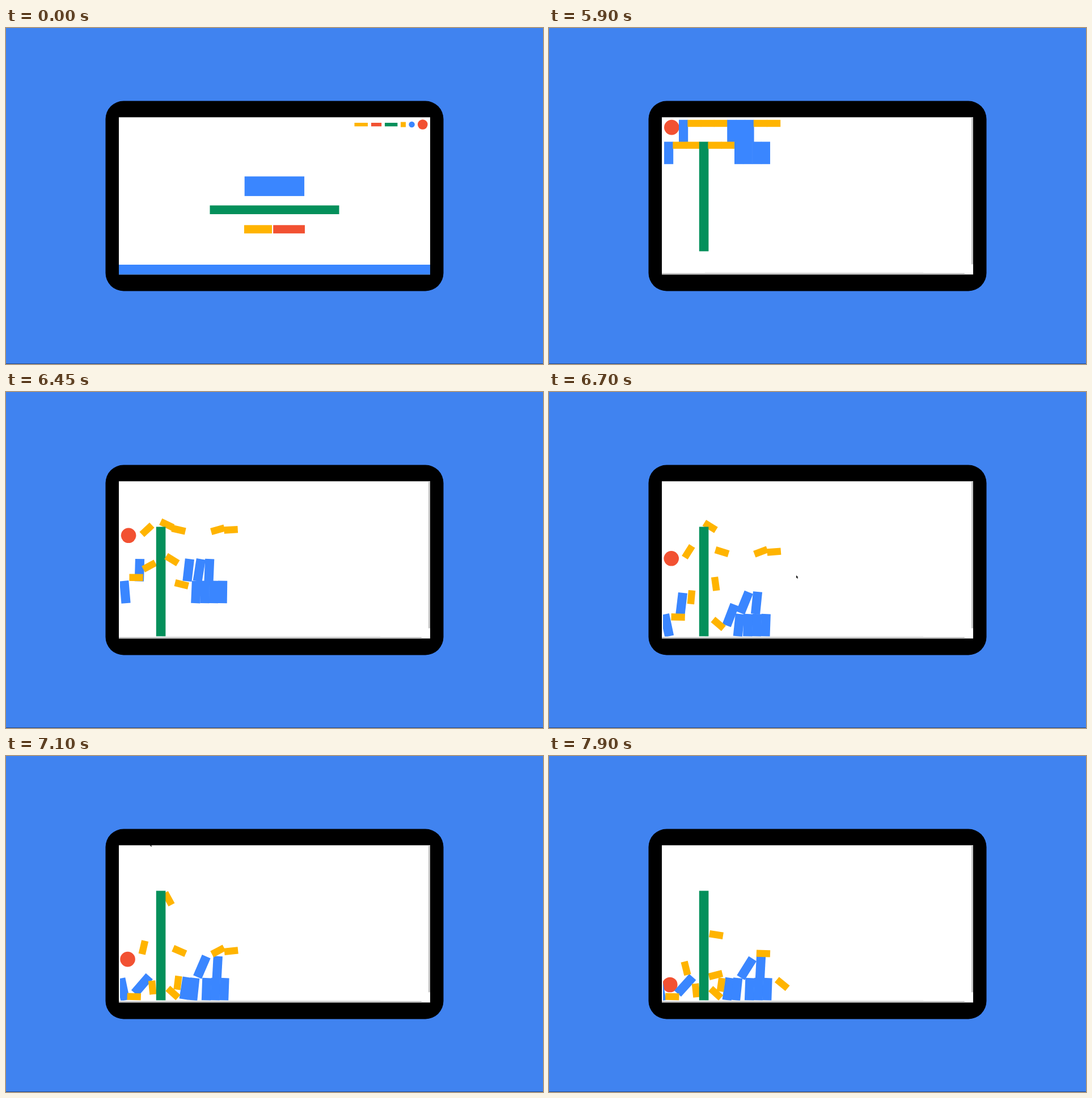
These frames come from a looping animation (947x592 px, 7.95 s). An HTML page:

```html
<!DOCTYPE html>
<html lang="en">
<head>
<meta charset="utf-8">
<title>Falling page blocks</title>
<style>
  html, body { margin: 0; width: 100%; height: 100%; overflow: hidden; background: #4083f0; }
  svg { display: block; width: 100vw; height: 100vh; }
  .blue { fill: #3a86ff; }
  .green { fill: #04905b; }
  .yellow { fill: #ffb400; }
  .red { fill: #f25132; }
</style>
</head>
<body>
<svg viewBox="0 0 947 592">
  <defs>
    <clipPath id="screen"><rect x="199" y="157.3" width="549" height="277"/></clipPath>
    <clipPath id="world"><rect x="201" y="157.3" width="544" height="273.5"/></clipPath>
  </defs>
  <rect width="947" height="592" fill="#4083f0"/>
  <rect y="591" width="947" height="1" fill="#254b8a"/>
  <rect x="175.5" y="128.5" width="596" height="335" rx="32"/>
  <rect x="199" y="157.3" width="549" height="277" fill="#fff"/>
  <g id="page">
    <rect class="yellow" x="614.5" y="167" width="23.5" height="6.3"/>
    <rect class="red" x="644" y="167" width="18.2" height="6.3"/>
    <rect class="green" x="668" y="167" width="22.4" height="6.3"/>
    <rect class="yellow" x="696" y="165.6" width="9" height="9"/>
    <circle class="blue" cx="715.6" cy="170" r="5.2"/>
    <circle class="red" cx="734.8" cy="170" r="8.8"/>
    <rect class="blue" x="420.7" y="261.5" width="105.4" height="34.6"/>
    <rect class="green" x="359.5" y="312.6" width="228" height="15.4"/>
    <rect class="yellow" x="420" y="347.3" width="49" height="14.6"/>
    <rect class="red" x="471.2" y="347.3" width="55.8" height="14.6"/>
    <rect class="blue" x="199" y="417" width="549" height="17.3"/>
  </g>
  <g id="fall">
    <g fill="#c6c6c6">
      <rect x="744.8" y="157.3" width="3.2" height="259"/>
      <rect x="199" y="431.8" width="534" height="2.5"/>
    </g>
    <rect x="275" y="430.2" width="385" height="1.2" fill="#ececec"/>
    <g id="blocks" clip-path="url(#world)"></g>
    <g clip-path="url(#screen)">
      <path id="cursor" d="M0 0V5L1.2 4L2 6L3 5.5L2.2 3.6H3.6Z" fill="#111"/>
    </g>
  </g>
</svg>
<script>
const LOOP = 7950, STEP = 50, SWITCH = 5800, RELEASE = 5900;
const GRAVITY = 0.0023, FLOOR = 430.5;
const $ = id => document.getElementById(id);

// advance = layout width, w/h = drawn size, speed = terminal speed in px/ms
const KINDS = {
  ball: { color: 'red', advance: 26, w: 26.6, h: 26.6, speed: 0.162 },
  post: { color: 'green', advance: 15.6, w: 16.6, h: 193, speed: 0.32 },
  brick: { color: 'blue', advance: 15.6, w: 16.2, h: 39.4, speed: 0.32 },
  chip: { color: 'yellow', advance: 23.2, w: 24.2, h: 12.4, speed: 0.155 }
};

// Bodies fall with drag to a contact height, then settle quickly or topple slowly.
class Body {
  constructor(kind, speed) {
    Object.assign(this, KINDS[kind], { kind, move: [0, 0, 0] });
    this.speed = speed || this.speed;
    this.lag = this.speed / GRAVITY;
    this.land(FLOOR - this.h / 2);
  }
  land(y, turn = 0, dx = 0) { return Object.assign(this, { landY: y, turn, dx }); }
  settle(...move) { return Object.assign(this, { move, ease: after => 1 - Math.exp(-((after / 250) ** 2)) }); }
  topple(...move) { return Object.assign(this, { move, ease: (after, left) => (after / left) ** 2 }); }

  place(left, top) {
    this.x = left + this.advance / 2 + 0.3;
    this.y = top + this.h / 2;
    this.node = document.createElementNS('http://www.w3.org/2000/svg', 'rect');
    const attrs = { class: this.color, x: -this.w / 2, y: -this.h / 2, width: this.w, height: this.h };
    if (this.kind === 'ball') attrs.rx = this.w / 2;
    for (const name in attrs) this.node.setAttribute(name, attrs[name]);
    $('blocks').append(this.node);
  }

  draw(time) {
    const { speed, lag } = this;
    const drop = this.landY - this.y;
    const contact = drop / speed + lag;
    const fallen = speed * (time - lag * (1 - Math.exp(-time / lag)));
    const k = Math.min(1, fallen / drop);
    const lean = k ** (speed < 0.16 ? 0.7 : 2.5); // light bodies tilt early
    const after = time - contact;
    const shift = this.ease && after > 0 ? this.ease(after, LOOP - RELEASE - contact) : 0;
    const [dy, turn, dx] = this.move.map(v => v * shift);
    const x = this.x + this.dx * lean + dx;
    const y = this.y + drop * k + dy;
    this.node.setAttribute('transform', `translate(${x} ${y}) rotate(${this.turn * lean + turn})`);
  }
}

const body = (kind, speed) => new Body(kind, speed);

// land(y, turn, dx), then settle or topple(dy, turn, dx)
const topRow = [
  body('ball').land(403, 0, -3),
  body('brick').land(371, 4, -4).settle(33, 38, 7),
  body('chip').land(336, -76, -14).settle(38, -28, -1),
  body('chip').land(233.5, 25, 4).topple(87, 175, 12),
  body('chip').land(351, 24, 3).settle(35, -38, -12),
  body('brick').land(393, 21, -2).settle(17.5, -13, -4),
  body('brick').land(371, 22, 7).topple(3, 11, 4),
  body('brick').land(371.5, 6, 12).settle(1, -3, 7.5),
  body('chip').land(344.5, -28, 1).settle(3.5, 30, 4),
  body('chip').land(345, -6, 1).topple(64, 51, 16)
];
const bottomRow = [
  body('brick').land(411, -12, -3).topple(1, 2, -14),
  body('chip', 0.28).land(424, 2, -4).topple(0, 0, -10),
  body('chip', 0.22).land(368, -94, -3).settle(45, -2, 8.5),
  body('post'),
  body('chip', 0.19).land(337, 82, 1).settle(66, 16, 10),
  body('chip', 0.32).land(408.5, 40, -17).settle(9.5, 2, -4.5)
];
// The last bricks land together; the first one leans away from the others.
for (let i = 0; i < 4; i++) {
  bottomRow.push(body('brick').land(410.8, i ? 2 : 6).settle(0, 0, i ? 3 : -4));
}

[topRow, bottomRow].forEach((row, line) => {
  let left = 203;
  for (const item of row) {
    item.place(left, 161.8 + line * 38.6);
    left += item.advance;
  }
});
const bodies = [...topRow, ...bottomRow];

function drawCursor(t) {
  const u = Math.max(0, Math.min(1, (t - 6700) / 400));
  const k = u * u * (3 - 2 * u);
  $('cursor').style.display = t >= 6600 && t < 7150 ? '' : 'none';
  $('cursor').setAttribute('transform', `translate(${436 - 182 * k} ${323 - 169 * k})`);
}

function draw(t) {
  const falling = t >= SWITCH;
  $('page').style.display = falling ? 'none' : '';
  $('fall').style.display = falling ? '' : 'none';
  if (!falling) return;
  for (const item of bodies) item.draw(Math.max(0, t - RELEASE));
  drawCursor(t);
}

const origin = performance.now();
function tick() {
  const t = (performance.now() - origin) % LOOP;
  draw(Math.floor(t / STEP) * STEP);
  requestAnimationFrame(tick);
}
tick();
</script>
</body>
</html>
```
